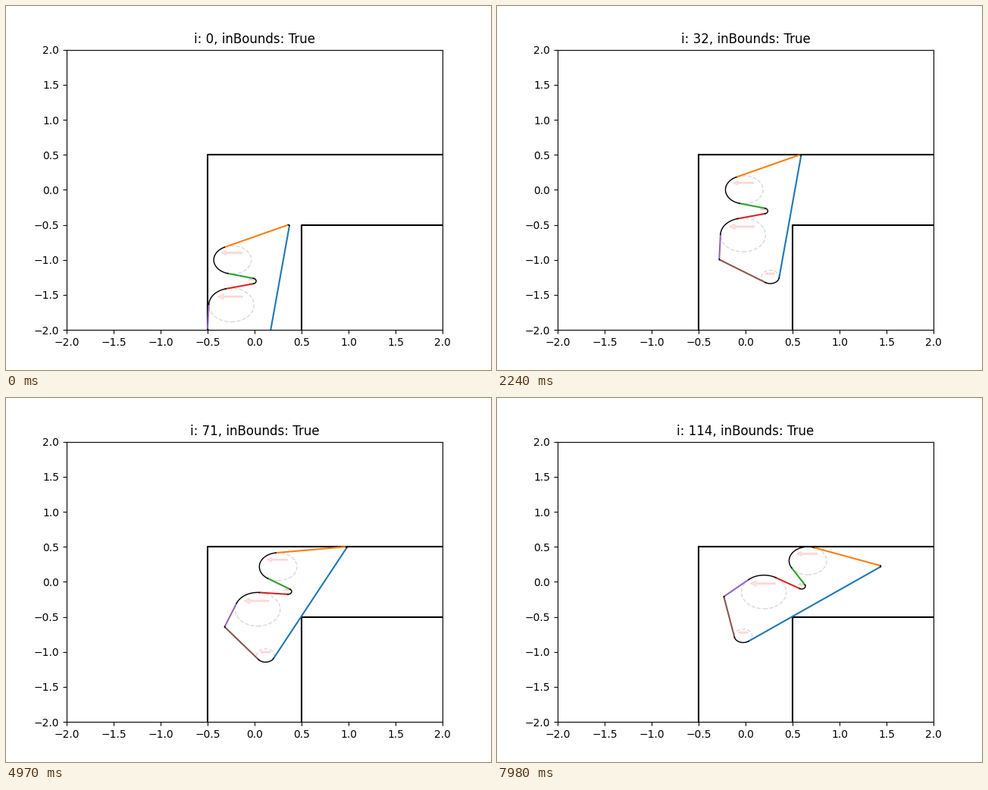
Animation of 640x480 px, one loop 8000 ms. Source, as a matplotlib script:

```python
import numpy as np
import matplotlib.pyplot as plt
from matplotlib.animation import FuncAnimation
from matplotlib.patches import Circle, FancyArrow

LOOP, INTERVAL, STEP = 8000, 20, 70  # ms
TAU = 2 * np.pi

# Corner circles of the sofa, counterclockwise; side -1 marks the inward notch.
centers = np.array([(.361, -.51), (-.234, -1.0), (-.023, -1.302),
                    (-.247, -1.645), (-.49, -1.99), (.043, -2.243)])
radii = np.array([.01, .2, .04, .24, .01, .095])
sides = np.array([1, 1, -1, 1, 1, 1])
N = len(radii)
TIP, HEAD = 0, 1
INNER = np.array([.5, -.5])
GAP = .005


def unit(a):
    return np.stack([np.cos(a), np.sin(a)], axis=-1)


def normal_angle(k):
    """Outward normal of the tangent from circle k to the next one."""
    m = (k + 1) % N
    d = centers[m] - centers[k]
    diff = sides[k] * radii[k] - sides[m] * radii[m]
    return np.arctan2(d[1], d[0]) - np.arccos(diff / np.hypot(*d))


normals = [normal_angle(k) for k in range(N)]


def tangent(k):
    ends = [k, (k + 1) % N]
    return centers[ends] + (sides * radii)[ends, None] * unit(normals[k])


def corner_arc(k):
    start, s = normals[k - 1], sides[k]
    sweep = s * ((s * (normals[k] - start)) % TAU)
    a = start + np.linspace(0, sweep, 50)
    return centers[k] + s * radii[k] * unit(a)


# The long straight side runs from the last circle back to the tip.
order = [N - 1] + list(range(N - 1))
edges = [tangent(k) for k in order]
arcs = [corner_arc(k) for k in range(N)]
long_normal = normals[N - 1]


def turn(pivot, place):
    """Clockwise turn that keeps the long side clear of the inner corner."""
    reach = (centers[TIP] - centers[pivot]) @ unit(long_normal) + radii[TIP] + GAP
    d = INNER - place
    a = np.arctan2(d[1], d[0]) + np.arccos(reach / np.hypot(*d)) - long_normal
    a = (a + np.pi) % TAU - np.pi
    return min(a, 0)


def pose(i):
    if i <= 10:
        return TIP, centers[TIP] + (0, .1 * i), 0
    if i < 86:
        pivot, place = TIP, np.array([.361 + .01 * (i - 10), .49])
    else:
        pivot, place = HEAD, np.array([.533 + .01 * (i - 101), .3])
    return pivot, place, turn(pivot, place)


fig, ax = plt.subplots(figsize=(6.4, 4.8), dpi=100)
ax.set_xlim(-2, 2)
ax.set_ylim(-2, 2)
title = ax.set_title("")

for c in (.5, -.5):
    ax.plot([-c, -c, 2], [-2, c, c], color="black", lw=1.5)

edge_lines = [ax.plot([], [], color=f"C{n}", lw=1.5)[0] for n in range(N)]
arc_lines = [ax.plot([], [], color="black", lw=1)[0] for _ in range(N)]

rings, arrows = {}, {}
for k, r in enumerate(radii):
    if r < .02:
        continue
    rings[k] = ax.add_patch(Circle((0, 0), r, fill=False, ls="--", lw=1,
                                   ec="gray", alpha=.3))
    arrow = FancyArrow(r / 2, r / 2, -1.1 * r, 0, width=.02, head_width=r / 3,
                       head_length=r / 4, length_includes_head=True,
                       color="red", alpha=.1)
    arrows[k] = ax.add_patch(arrow), arrow.get_xy().copy()


def draw(frame):
    i = (frame * INTERVAL + INTERVAL // 2) // STEP
    pivot, place, a = pose(i)
    c, s = np.cos(a), np.sin(a)
    rot = np.array([(c, s), (-s, c)])

    def move(pts):
        return place + (pts - centers[pivot]) @ rot

    for line, pts in zip(edge_lines + arc_lines, edges + arcs):
        line.set_data(*move(pts).T)
    spots = move(centers)
    for k, ring in rings.items():
        ring.set_center(spots[k])
        arrow, shape = arrows[k]
        arrow.set_xy(shape + spots[k])
    title.set_text(f"i: {i}, inBounds: True")
    return []


anim = FuncAnimation(fig, draw, frames=LOOP // INTERVAL, interval=INTERVAL,
                     repeat=True, cache_frame_data=False)
plt.show()
```
